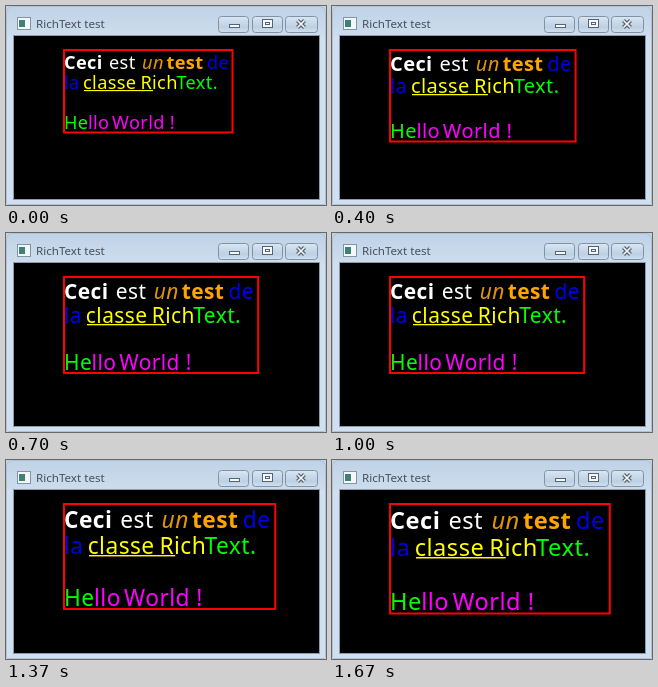
An HTML page with a canvas that plays this animation: 320x199 px, repeating every 1.71 s.

```html
<!DOCTYPE html>
<html lang="fr">
<head>
<meta charset="utf-8">
<title>RichText test</title>
<style>
html, body { margin: 0; width: 100%; height: 100%; overflow: hidden; background: #c8d9eb; }
canvas { display: block; width: 320px; height: 199px; }
</style>
</head>
<body>
<canvas id="stage" width="320" height="199"></canvas>
<script>
const ctx = document.getElementById('stage').getContext('2d');
const FAMILY = '"Noto Sans", "Open Sans", sans-serif';
const LOOP = 1710;
const LEFT = 58;
const TOP = 43;
const WHITE = '#fff', BLUE = '#0000e6', YELLOW = '#ff0', GREEN = '#0f0', PINK = '#f0f';

// The text grows by one size at each of these times, in ms.
const GROWTH = [70, 400, 700, 1030, 1370, 1670];

// Each start is measured from the left edge in units of the character size.
const SPANS = [
  { text: 'Ceci', at: 0, row: 0, color: WHITE, style: 'bold' },
  { text: 'est', at: 2.25, row: 0, color: WHITE },
  { text: 'un', at: 3.9, row: 0, color: '#e0940c', style: 'italic' },
  { text: 'test', at: 5.12, row: 0, color: '#ffa500', style: 'bold' },
  { text: 'de', at: 7.15, row: 0, color: BLUE },
  { text: 'la', at: 0, row: 1, color: BLUE },
  { text: 'classe', at: 0.95, row: 1, color: YELLOW },
  { text: 'R', at: 3.82, row: 1, color: YELLOW },
  { text: 'ich', at: 4.4, row: 1, color: YELLOW },
  { text: 'Text.', at: 5.62, row: 1, color: GREEN },
  { text: 'He', at: 0, row: 3, color: GREEN },
  { text: 'llo', at: 1.2, row: 3, color: PINK },
  { text: 'World !', at: 2.4, row: 3, color: PINK }
];
const UNDERLINE = { from: 1, to: 4.45, row: 1 };

function rect(color, x, y, w, h) {
  ctx.fillStyle = color;
  ctx.fillRect(x, y, w, h);
}

function frameRect(color, x, y, w, h, line = 1) {
  ctx.strokeStyle = color;
  ctx.lineWidth = line;
  ctx.strokeRect(x + line / 2, y + line / 2, w - line, h - line);
}

function vertical(y0, y1, ...colors) {
  const g = ctx.createLinearGradient(0, y0, 0, y1);
  colors.forEach((c, i) => g.addColorStop(i / (colors.length - 1), c));
  return g;
}

function rounded(x, y, w, h, r) {
  ctx.beginPath();
  ctx.roundRect(x, y, w, h, r);
}

function button(x, w) {
  rounded(x + 0.5, 10.5, w - 1, 16, 3);
  ctx.fillStyle = vertical(10, 27, '#dce8f4', '#cbdbeb', '#bdd0e3', '#d2e2f1');
  ctx.fill();
  ctx.strokeStyle = '#8292a5';
  ctx.lineWidth = 1;
  ctx.stroke();
}

function cross(color, width) {
  ctx.strokeStyle = color;
  ctx.lineWidth = width;
  ctx.beginPath();
  ctx.moveTo(291.5, 14.5);
  ctx.lineTo(298.5, 21.5);
  ctx.moveTo(298.5, 14.5);
  ctx.lineTo(291.5, 21.5);
  ctx.stroke();
}

function drawWindow() {
  rect('#d0e0f0', 0, 0, 320, 199);
  rect(vertical(0, 30, '#bfd2e7', '#cddded'), 0, 0, 320, 30);
  rounded(0.5, 0.5, 319, 198, [6, 6, 1, 1]);
  ctx.strokeStyle = '#b0c0d1';
  ctx.lineWidth = 1;
  ctx.stroke();

  rect('#f4f7f9', 11, 11, 14, 13);
  frameRect('#8494a2', 11, 11, 14, 13);
  rect('#3f8078', 13, 14, 6, 7);

  ctx.font = `11.6px ${FAMILY}`;
  ctx.fillStyle = '#46505a';
  ctx.fillText('RichText test', 30, 22);

  button(212, 31);
  button(246, 31);
  button(279, 33);
  rect('#f4f8fb', 223, 18, 11, 4);
  frameRect('#566372', 223, 18, 11, 4);
  rect('#f4f8fb', 256, 13, 11, 9);
  frameRect('#566372', 256, 13, 11, 9);
  frameRect('#566372', 259, 16, 5, 3);
  cross('#566372', 4);
  cross('#f4f8fb', 1.6);

  frameRect('#8a9aa8', 7, 29, 307, 165);
  rect('#000', 8, 30, 305, 163);
}

function drawText(step) {
  const size = 20 + step;
  const px = size * 0.91;
  const column = at => LEFT + at * size;
  const baseline = row => Math.round(63 + step + row * (20 + step * 7 / 6));

  ctx.letterSpacing = `${px * 0.02}px`;
  for (const { text, at, row, color, style = '' } of SPANS) {
    ctx.font = `${style} ${px}px ${FAMILY}`;
    ctx.fillStyle = color;
    ctx.fillText(text, column(at), baseline(row));
  }
  ctx.letterSpacing = '0px';

  const { from, to, row } = UNDERLINE;
  rect(YELLOW, column(from), baseline(row) + 1, (to - from) * size, px / 16);

  const width = 8.55 * size - 0.5;
  const height = 84.5 + 4.5 * step;
  frameRect('#f00', LEFT - 1, TOP, width, height, 2);
}

function draw(now) {
  const t = now % LOOP;
  drawWindow();
  drawText(GROWTH.filter(start => start <= t).length);
}

const begin = performance.now();
function tick() {
  draw(performance.now() - begin);
  requestAnimationFrame(tick);
}
tick();
</script>
</body>
</html>
```
